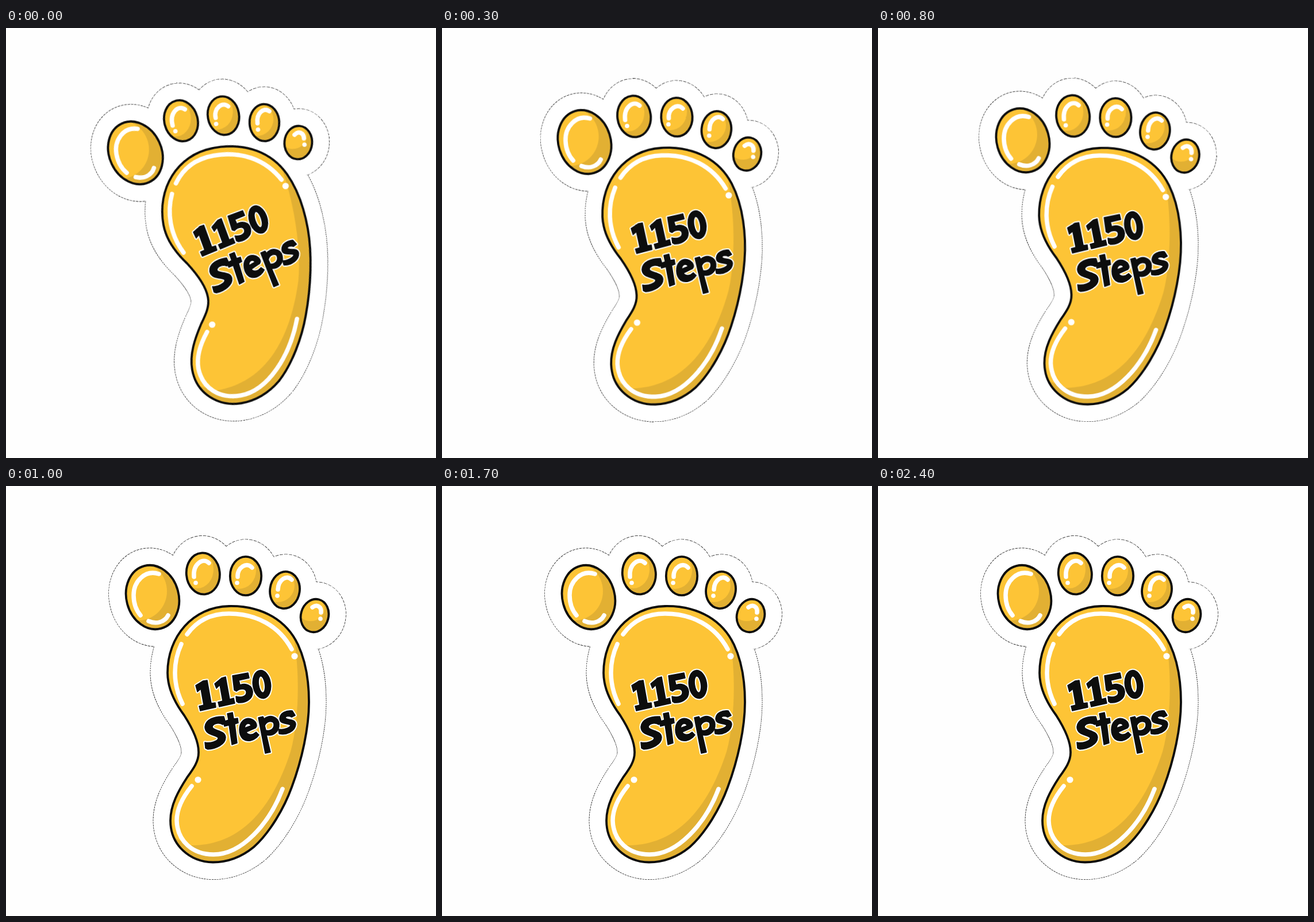
Recreate the animation shown at these times as an HTML page without scripts. Size 748 by 748 pixels, loop 2500 ms.

```html
<!DOCTYPE html>
<html lang="en">
<head>
<meta charset="utf-8">
<title>Step counter sticker</title>
<style>
  html, body { margin: 0; width: 100%; height: 100%; overflow: hidden; background: #fefefe; }
  svg { display: block; width: 100vw; height: 100vh; stroke-linejoin: round; stroke-linecap: round; }
  .foot { transform-origin: 374.5px 374px; animation: wobble 2.5s step-end infinite; }
  .edge { stroke: #111; stroke-width: 60.8; stroke-linecap: butt; stroke-dasharray: 2.4 .9; }
  .paper { fill: #fff; stroke: #fff; stroke-width: 59.4; }
  .dark { fill: #e2b033; }
  .light { fill: #fdc436; }
  .line { fill: none; stroke: #0c0d0d; stroke-width: 3.8; }
  .shine { fill: none; stroke: #fff; stroke-width: 7.5; }
  .dot { fill: #fff; }
  .ink { fill: #0c0d0d; stroke: #0c0d0d; stroke-width: 1.5; }
  .halo { fill: #fff; stroke: #fff; stroke-width: 5.5; }
  text { fill: none; font: bold 50px "DejaVu Sans", sans-serif; }

  /* damped swing, settling at zero */
  @keyframes wobble {
    0% { transform: rotate(-10.1deg); }
    4% { transform: rotate(10.5deg); }
    8% { transform: rotate(9.6deg); }
    12% { transform: rotate(-2.25deg); }
    16% { transform: rotate(-6.1deg); }
    20% { transform: rotate(-1.25deg); }
    24% { transform: rotate(2.8deg); }
    28% { transform: rotate(1.75deg); }
    32% { transform: rotate(-.95deg); }
    36% { transform: rotate(-1.3deg); }
    40% { transform: rotate(0deg); }
    44% { transform: rotate(.7deg); }
    48% { transform: rotate(.2deg); }
    52% { transform: rotate(-.33deg); }
    56% { transform: rotate(-.26deg); }
    60% { transform: rotate(.05deg); }
    64% { transform: rotate(.14deg); }
    68% { transform: rotate(0deg); }
    72% { transform: rotate(-.08deg); }
    76% { transform: rotate(-.04deg); }
    80%, 100% { transform: rotate(0deg); }
  }
</style>
</head>
<body>
<svg viewBox="0 0 748 748" role="img" aria-label="1150 Steps">
  <defs>
    <path id="shape" d="M388 209C449 208 489 236 508 276C522 306 527 338 527 376C527 420 515 476 497 524C484 560 459 603 431 628C409 646 385 654.5 360 654.5C320 654 286 625 286 582C286 555 300 530 315 507C325 493 335 480 335 464C335.500 446 326 424 310 399C293 376 281 352 281 325C281 262 325 210 388 209Z
      M211 205.3a45.5 56.3 -15 1 0 87.9 -23.6a45.5 56.3 -15 1 0 -87.9 23.6Z
      M313.9 155a29 36 -5 1 0 57.8 -5.1a29 36 -5 1 0 -57.8 5.1Z
      M389.8 156.5a27.2 33.7 0 1 0 54.4 0a27.2 33.7 0 1 0 -54.4 0Z
      M459.5 177.4a25.8 32.3 8 1 0 51.1 7.2a25.8 32.3 8 1 0 -51.1 -7.2Z
      M513.8 219.3a24 29 15 1 0 46.4 12.4a24 29 15 1 0 -46.4 -12.4Z"/>
    <clipPath id="inside"><use href="#shape"/></clipPath>
    <g id="letters" fill-rule="evenodd">
      <path d="M330 347L343 339L350 338L357 378L364 377L365 385L338 391L336 383L344 381L339 353L333 358Z"/>
      <path d="M363 344L375 334L382 332L389 371L396 369L398 378L371 384L369 376L377 374L372 346L366 352Z"/>
      <path d="M394 330L421 325L423 334L405 338L407 346C417 342 428 347 429 357C430 370 418 378 404 377L401 375L400 366C411 369 419 365 418 358C417 352 407 352 401 357L397 355Z"/>
      <path d="M429.6 347.2a15.5 24.5 -8 1 0 30.7 -4.3a15.5 24.5 -8 1 0 -30.7 4.3ZM439.5 345.8a5.5 14.5 -8 1 0 10.9 -1.5a5.5 14.5 -8 1 0 -10.9 1.5Z"/>
      <path d="M379 401L382 412L377 415C370 411 360 413 359 419C359 426 381 424 382 437C382 450 365 457 351 458L347 456L346 446C355 448 370 444 369 438C366 433 346 434 346 419C347 406 363 400 379 401Z"/>
      <path d="M385 396L394 394L396 405L403 404L404 412L398 414L402 447L393 450L388 416L380 418L378 410L387 407Z"/>
      <path d="M406 424C406 410 416 402 426 405C436 408 438 418 434 421L418 428C421 434 430 433 435 428L440 433C432 444 420 446 412 440Q406 434 406 424ZM415 421L426 417C425 411 416 412 415 421Z"/>
      <path d="M439 403L447 401L449 405C460 396 474 402 475 414C476 428 464 436 453 433L460 463L451 465ZM450 417L452 425C460 427 467 422 466 414C465 407 453 409 450 417Z"/>
      <path d="M498 391L503 399L497 402C491 399 486 401 486 403C488 408 504 404 504 415C503 427 488 434 475 431L474 423C483 425 495 420 495 416C491 412 476 416 476 404C477 394 488 390 498 391Z"/>
    </g>
  </defs>

  <g class="foot">
    <use href="#shape" class="edge"/>
    <use href="#shape" class="paper"/>
    <use href="#shape" class="dark"/>
    <g class="light" clip-path="url(#inside)">
      <path d="M500 262C510 310 512 400 495 462C470 540 420 628 318 625L270 600V290L330 204H460Z"/>
      <ellipse cx="230" cy="183" rx="50" ry="51"/>
      <ellipse cx="333" cy="145" rx="28" ry="33"/>
      <ellipse cx="405" cy="147" rx="30" ry="32"/>
      <ellipse cx="473" cy="173" rx="29" ry="29"/>
      <ellipse cx="530" cy="214" rx="24" ry="21"/>
    </g>
    <use href="#shape" class="line"/>

    <g class="shine">
      <path d="M315 258C333 233 358 222 388 222C435 222 475 243 497 284"/>
      <path d="M305 275C290 307 290 345 307 379"/>
      <path d="M323 522C306 543 297 562 297 582C298 618 325 641 361 641C410 641 458 588 481 527"/>
      <path d="M266 153C242 145 222 166 222 190Q222 211 234 225M248 235C261 241 276 237 282 225"/>
      <path d="M353 134C343 124 325 135 327 158"/>
      <path d="M428 142C419 131 402 142 403 158"/>
      <path d="M497 163C489 154 474 162 473 180"/>
      <path d="M533 211C541 205 549 210 548 220"/>
    </g>
    <g class="dot">
      <circle cx="502" cy="296" r="5.6"/>
      <circle cx="334" cy="511" r="5.6"/>
      <circle cx="330" cy="168.5" r="3.8"/>
      <circle cx="402" cy="168.5" r="3.8"/>
      <circle cx="472" cy="191" r="3.8"/>
      <circle cx="547" cy="231" r="3.8"/>
    </g>

    <use href="#letters" class="halo"/>
    <use href="#letters" class="ink"/>
    <g transform="rotate(-11 345 390)">
      <text x="345" y="390">1150</text>
      <text x="333" y="456">Steps</text>
    </g>
  </g>
</svg>
</body>
</html>
```
